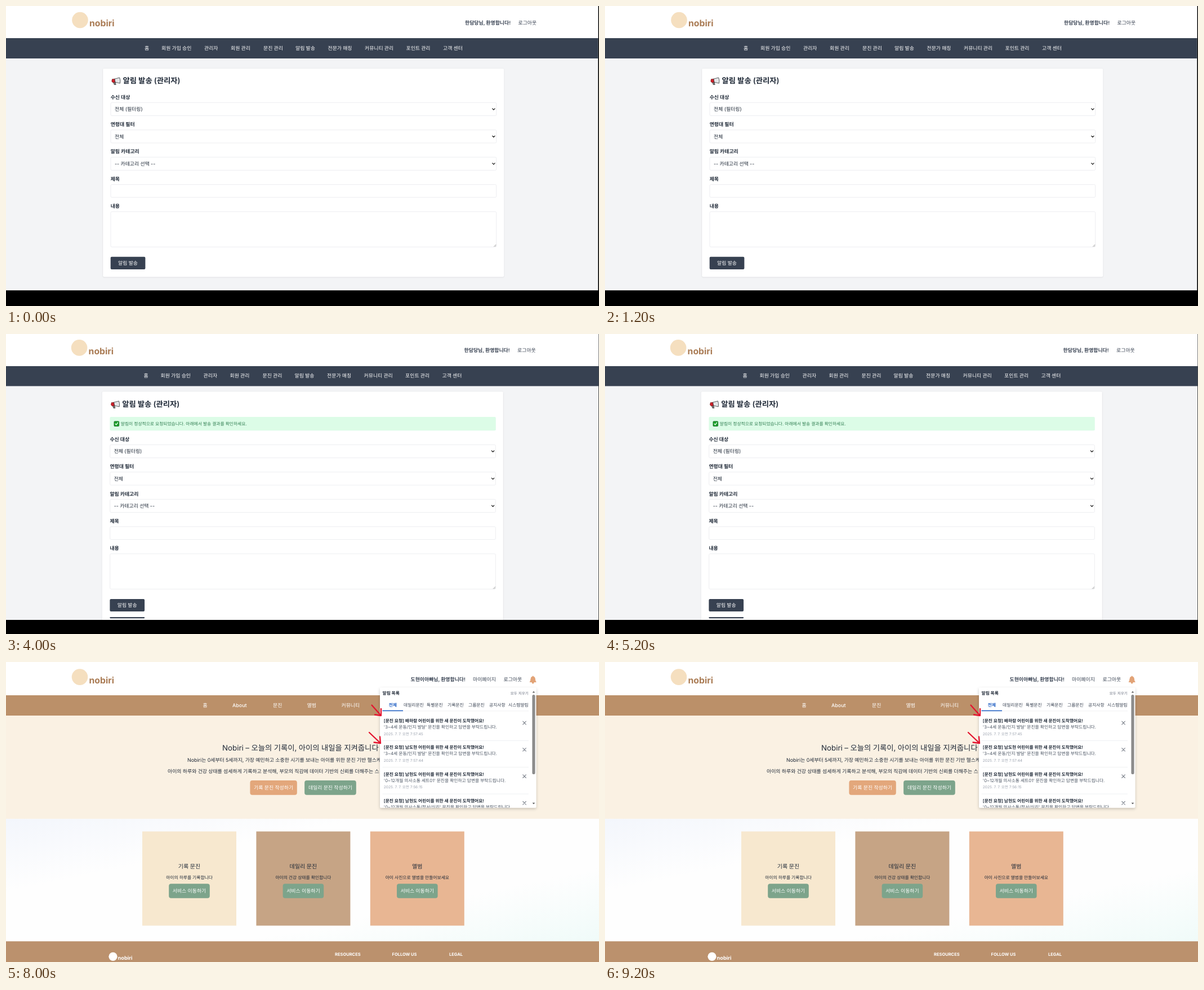
Write an HTML page that moves like this. It is 1053x532 px and loops after 10000 ms.

```html
<!DOCTYPE html>
<html lang="ko">
<head>
<meta charset="utf-8">
<title>알림 발송</title>
<style>
  html, body { margin: 0; width: 100%; height: 100%; overflow: hidden; background: #000; }
  svg { display: block; width: 100vw; height: 100vh; }
  text {
    font-family: Inter, 'Noto Sans CJK KR', 'Noto Sans CJK', sans-serif;
    text-rendering: geometricPrecision; word-spacing: -0.02em;
  }
</style>
</head>
<body>
<svg id="stage" viewBox="0 0 1053 532" xmlns="http://www.w3.org/2000/svg"></svg>
<script>
const SLOT = 2000;
const BRAND = 'nobiri', BRAND_CAP = 'Nobiri';
const INK = '#1f2937', SLATE = '#374151', LINE = '#e5e7eb', RED = '#e3142f', GREEN = '#7da48b';
const BASE = 8.9, SMALL = 7.78, TINY = 6.67;

// Text is placed by its vertical centre.
const text = (x, y, s, { size = BASE, fill = INK, w = 400, anchor = 'start' } = {}) =>
  `<text x="${x}" y="${y + size * 0.37}" font-size="${size}" font-weight="${w}" fill="${fill}" text-anchor="${anchor}">${s}</text>`;
const rect = (x0, y0, x1, y1, fill, r = 0, extra = '') =>
  `<rect x="${x0}" y="${y0}" width="${x1 - x0}" height="${y1 - y0}" rx="${r}" fill="${fill}" ${extra}/>`;
const frame = (x0, y0, x1, y1, fill = '#fff', stroke = LINE) =>
  rect(x0 + 0.3, y0 + 0.3, x1 - 0.3, y1 - 0.3, fill, 2, `stroke="${stroke}" stroke-width="0.7"`);
const path = (d, stroke, width = 1, fill = 'none') =>
  `<path d="${d}" stroke="${stroke}" stroke-width="${width}" fill="${fill}" stroke-linecap="round" stroke-linejoin="round"/>`;
const circle = (x, y, r, fill) => `<circle cx="${x}" cy="${y}" r="${r}" fill="${fill}"/>`;
const shift = (x, y, body) => `<g transform="translate(${x} ${y})">${body}</g>`;

const megaphone = (x, y) => shift(x, y,
  path('M3 2L5 7L8 7L7 2Z', '#3a3a3a', 0.7, '#777') +
  path('M1.5 -2.5L6 -3.3L7 2.6L2.6 3Q-.6 2 1.5 -2.5Z', '#6e1012', 0.7, '#d0202a') +
  path('M6 -3.3L14.5 -5.5Q16.5 -1 15.3 4.6L7 2.6Z', '#33363a', 0.8, '#e4e6e8'));
const tick = (x, y, s) =>
  rect(x, y - s / 2, x + s, y + s / 2, '#18a32a', 1, 'stroke="#0d5f19" stroke-width="0.8"') +
  path(`M${x + s * .24} ${y}L${x + s * .42} ${y + s * .22}L${x + s * .77} ${y - s * .24}`, '#fff', 1.2);
const cross = (x, y, r, color, w) =>
  path(`M${x - r} ${y - r}L${x + r} ${y + r}M${x + r} ${y - r}L${x - r} ${y + r}`, color, w);
const rocket = (x, y) => shift(x, y,
  path('M3 0L0 1L1 3L4 3ZM7 4L7 8L9 7L10 4Z', '#5c1a1a', 0.7, '#b83232') +
  path('M2 4L0 8L5 6Z', '#c0761c', 0.5, '#f0a934') +
  path('M3 3Q7 -4 13 -5Q12 1 6 6Z', '#1f2937', 1.1, '#d5dce2') +
  circle(8.6, -0.6, 1.4, '#34688f'));

const logo = (x, y) =>
  circle(x + 14.5, y, 14.3, '#f5dfbf') +
  `<text x="${x + 31}" y="${y + 11.4}" font-size="15.8" font-weight="700" fill="#aa7c55">${BRAND}</text>`;

function adminHeader(dx, dy, right) {
  const xs = [246, 276, 352, 399, 457, 514, 571.5, 637, 710.5, 776];
  const names = ['홈', '회원 가입 승인', '관리자', '회원 관리', '문진 관리', '알림 발송',
    '전문가 매칭', '커뮤니티 관리', '포인트 관리', '고객 센터'];
  return rect(0, 0, right, 57, '#fff') + rect(0, 57, right, 93 + dy, SLATE) +
    shift(dx, dy, logo(117, 25) +
      text(815, 29.5, '한담당님, 환영합니다!', { w: 600, fill: SLATE }) +
      text(909.5, 29.5, '로그아웃', { fill: SLATE }) +
      names.map((s, i) => text(xs[i], 74.6, s, { w: 500, fill: '#fff' })).join(''));
}

// Page ground, white card and header; the body is cut at the bottom edge.
function adminPage(dx, dy, right, bottom, cardTop, cardEnd, body) {
  const x = 172.3 + dx;
  return rect(0, 0, 1053, 532, '#000') + rect(0, 0, right, bottom, '#f3f4f6') +
    rect(x, cardTop, x + 711.8, cardEnd, '#fff', 2, 'filter="url(#soft)"') + body +
    adminHeader(dx, dy, right) + rect(0, bottom, 1053, 532, '#000');
}

const label = (x, y, s) => text(x, y, s, { w: 600 });

function select(x, y, name, value, off) {
  const ink = off ? '#7b8088' : INK;
  return label(x, y, name) + frame(x, y + 9.6, x + 685.3, y + 33.4) +
    text(x + 7.3, y + 21.6, value, { fill: ink }) +
    path(`M${x + 678} ${y + 20.5}l2.2 2.2l2.2 -2.2`, off ? '#777' : '#111', 1.2);
}

function message(x, y, title, content) {
  const x1 = x + 685.3, b = y + 121;
  return label(x, y, '제목') + frame(x, y + 9.7, x1, y + 33) + text(x + 5, y + 21.3, title) +
    label(x, y + 48.3, '내용') + frame(x, y + 57.8, x1, b) + text(x + 5, y + 69, content) +
    path(`M${x1 - 4.5} ${b - 1}l3.5 -3.5M${x1 - 2.5} ${b - 1}l1.5 -1.5`, '#777', 0.6) +
    rect(x, y + 138.2, x + 61.7, y + 160.4, SLATE, 2) +
    text(x + 30.85, y + 149, '알림 발송', { w: 500, fill: '#fff', anchor: 'middle' });
}

const heading = (x, y) => megaphone(x + 1.5, y) +
  text(x + 21.8, y, '알림 발송 (관리자)', { size: 13.34, w: 600 });

const blankForm = (x, y) =>
  select(x, y, '수신 대상', '전체 (필터링)') +
  select(x, y + 48.4, '연령대 필터', '전체') +
  select(x, y + 96.8, '알림 카테고리', '-- 카테고리 선택 --') +
  message(x, y + 145.2, '', '');

const emptyScene = () => adminPage(0, 0, 1051.4, 504.5, 111, 480.3,
  heading(185.7, 132.5) + blankForm(185.7, 161.4));

function filledScene() {
  const x = 184.4, set = '3~4세 운동/인지 발달';
  const rows = [['수신 대상', '위험군 (문진 발송)'], ['연령대 필터', '3~4세'],
    ['위험 카테고리 필터', '운동/인지 발달'], ['문진 세트 선택', set], ['알림 카테고리', '특별문진']];
  return adminPage(-1.4, -0.6, 1052.3, 507, 60, 540,
    rows.map((r, i) => select(x, 102 + i * 48.4, ...r, i === 4)).join('') +
    message(x, 343.8, set, `[${set}] 문진을 확인하고 답변을 부탁드립니다.`) +
    path('M254 461L237.5 477.5M238 467L237.5 477.8L249 477.5', RED, 2.3));
}

const sentScene = () => adminPage(-1.4, -0.6, 1052.3, 507, 102.3, 540,
  heading(184.4, 124.4) +
  rect(184.4, 147, 869.8, 171.3, '#dcfce7', 2) + tick(192, 159.2, 8.6) +
  text(203.8, 159, '알림이 정상적으로 요청되었습니다. 아래에서 발송 결과를 확인하세요.', { size: SMALL, fill: '#2f7d50' }) +
  blankForm(184.4, 186.5) + rect(184.4, 502, 246.1, 504.2, SLATE, 1));

function panel(top, split, bottom, title, rows, ink, titleInk, fill, border) {
  const x0 = 183.9, x1 = 869.4, mid = (top + split) / 2 - 0.3;
  return frame(x0, top, x1, bottom, '#fff', border) + frame(x0, top, x1, split, fill, border) +
    text(191.3, mid, title, { w: 600, fill: titleInk }) +
    path(`M854 ${mid + 1.9}l3.7 -3.8l3.7 3.8`, titleInk, 1.3) +
    rows.map((s, i) => {
      const y = split + 15.2 + i * 17.8;
      return circle(196.4, y + 0.6, 1.6, ink) + text(204.5, y, s, { fill: ink });
    }).join('');
}

function resultScene() {
  const child = (who, kid) => `${who} 님 [자녀: ${kid}]`;
  const good = [['문해솔', '배나림'], ['문해솔', '구다온'], ['문해솔', '구소온'], ['문해솔', '노라온'],
    ['표한결결', '남도현'], ['표한결결', '배하람']].map(p => child(...p) + ' 님');
  const bad = [['연습용계정4', '구아람'], ['채우진', '배시온'], ['채우진', '류가온'], ['보통인남철규', '남시누이4'],
    ['보통인남철규', '장오빠4'], ['보통인남철규', '류단우'], ['표한결', '길새봄']].map(p => child(...p));
  const count = (x, name, n, color) =>
    text(x, 138, `${name}: <tspan fill="${color}">${n}</tspan> 건`, { w: 600 });
  return adminPage(-2, -0.6, 1053, 507, 60, 540,
    rocket(185, 104.5) + text(202, 105, '발송 결과', { size: 11.12, w: 600 }) +
    frame(183.9, 121.8, 869.4, 154.3, '#f3fcfe', '#dfeaee') +
    tick(194.5, 138, 9.2) + count(207.8, '성공', 6, '#25964c') +
    cross(537, 138, 3, '#7c1616', 3.2) + cross(537, 138, 3, '#d22f2f', 2) + count(545, '실패', 7, '#d93636') +
    panel(163.4, 190.7, 320.7, '성공 내역 확인하기', good, '#4b5563', SLATE, '#f3f4f6', LINE) +
    panel(327.4, 354.9, 502.6, '실패 내역 확인하기', bad, '#a13030', '#991b1b', '#fef2f2', '#ecd5d5') +
    path('M193 285Q250 284.4 317.5 285', RED, 2.2) +
    path('M192 302.6Q250 302.4 319 304', RED, 2.2));
}

function notice(i, kid, set, time) {
  const y = 104 + i * 47.35;
  return text(670.8, y, `[문진 요청] ${kid} 어린이를 위한 새 문진이 도착했어요!`, { size: SMALL, w: 600 }) +
    text(670.8, y + 11.2, `'${set}' 문진을 확인하고 답변을 부탁드립니다.`, { size: SMALL, fill: '#4b5563' }) +
    text(670.8, y + 23.2, `2025. 7. 7. 오전 ${time}`, { size: TINY, fill: '#9ca3af' }) +
    cross(920.6, y + 4, 2.8, '#7b818b', 1.1) +
    rect(668.5, y + 35, 928, y + 35.6, LINE);
}

function popup() {
  const tabs = [[706, '데일리문진'], [747, '특별문진'], [784, '기록문진'], [821, '그룹문진'],
    [858, '공지사항'], [892, '시스템알림']];
  const notices = [['배하람', '3~4세 운동/인지 발달', '7:57:45'], ['남도현', '3~4세 운동/인지 발달', '7:57:44'],
    ['남현도', '0~12개월 의사소통 세트01', '7:56:15'], ['남현도', '0~12개월 의사소통/정서/심리', '7:56:15']];
  return rect(664, 45.5, 941.5, 258.5, '#fff', 2, 'filter="url(#deep)"') +
    `<g clip-path="url(#list)">` +
    text(668.5, 55.6, '알림 목록', { size: SMALL, w: 600 }) +
    text(928, 55.6, '모두 지우기', { size: TINY, fill: '#6b7280', anchor: 'end' }) +
    text(687, 75.8, '전체', { size: SMALL, w: 600, fill: '#2563c4', anchor: 'middle' }) +
    tabs.map(([x, s]) => text(x, 76, s, { size: SMALL, fill: SLATE })).join('') +
    rect(668.5, 86.6, 928, 87.2, LINE) + rect(668.5, 85.6, 705, 87.2, '#2563c4') +
    notices.map((n, i) => notice(i, ...n)).join('') + '</g>' +
    rect(934.4, 58, 939.6, 199, '#8c8c8c', 2.6) +
    path('M935.4 54L937 52L938.6 54ZM935.4 250L937 252L938.6 250Z', '#555', 0.5, '#555');
}

const pill = (x0, y0, x1, y1, fill, s) => rect(x0, y0, x1, y1, fill, 4) +
  text((x0 + x1) / 2, (y0 + y1) / 2, s, { fill: '#fff', anchor: 'middle' });

function tile(x, fill, title, note) {
  const c = x + 83.5;
  return rect(x, 300.5, x + 167, 467.5, fill) +
    text(c, 362.5, title, { size: 10, anchor: 'middle' }) +
    text(c, 382.5, note, { size: SMALL, anchor: 'middle' }) +
    pill(c - 36.3, 393.2, c + 36.3, 418.8, GREEN, '서비스 이동하기');
}

function homeScene() {
  const menu = [[349.5, '홈'], [402, 'About'], [474, '문진'], [534.5, '앨범'], [595.5, '커뮤니티']];
  const foot = [[584, 'RESOURCES'], [685.5, 'FOLLOW US'], [787, 'LEGAL']];
  return rect(0, 0, 1053, 532, '#fff') + logo(116.5, 26.6) +
    text(718.5, 31, '도현이아빠님, 환영합니다!', { w: 600, fill: SLATE }) +
    text(829, 31, '마이페이지', { fill: SLATE }) + text(883.5, 31, '로그아웃', { fill: SLATE }) +
    path('M930.5 35.2Q932 33.5 932 30Q932 26 935.7 26Q939.4 26 939.4 30Q939.4 33.5 941 35.2Z', '#e2a377', 1, '#e2a377') +
    circle(935.7, 36.5, 1.9, '#e2a377') + circle(935.7, 25.4, 1, '#e2a377') +
    rect(0, 59, 1053, 95, '#bb9069') +
    menu.map(([x, s]) => text(x, 76.4, s, { w: 500, fill: '#fff' })).join('') +
    rect(0, 95, 1053, 278.3, '#faf1e3') +
    text(384, 152, `${BRAND_CAP} – 오늘의 기록이, 아이의 내일을 지켜줍니다`, { size: 13.34 }) +
    text(322, 173.7, `${BRAND_CAP}는 0세부터 5세까지, 가장 예민하고 소중한 시기를 보내는 아이를 위한 문진 기반 헬스케어`) +
    text(287, 193.8, '아이의 하루와 건강 상태를 섬세하게 기록하고 분석해, 부모의 직감에 데이터 기반의 신뢰를 더해주는 스') +
    pill(433.4, 210, 516.8, 235.8, '#e3a77b', '기록 문진 작성하기') +
    pill(530.1, 210, 621.8, 235.8, GREEN, '데일리 문진 작성하기') +
    rect(0, 278.3, 1053, 495.3, 'url(#haze)') +
    tile(242, '#f7e8cf', '기록 문진', '아이의 하루를 기록합니다') +
    tile(444.4, '#c6a485', '데일리 문진', '아이의 건강 상태를 확인합니다') +
    tile(646.8, '#e8b693', '앨범', '아이 사진으로 앨범을 만들어보세요') +
    rect(0, 495.3, 1053, 532, '#bb916d') +
    circle(190, 522.3, 7.6, '#fff') +
    text(198.6, 524.5, BRAND, { size: 9.2, w: 700, fill: '#fff' }) +
    foot.map(([x, s]) => text(x, 518.5, s, { size: 7.5, w: 700, fill: '#fff' })).join('') +
    popup() +
    path('M649.5 76.5L665.5 94.5M666 83L666 95L655 93.5', RED, 2.3) +
    path('M645 125L664.5 143.5M664 132.5L665 144L653.5 142.5', RED, 2.3);
}

const defs = `<defs>
  <filter id="soft" x="-5%" y="-5%" width="110%" height="110%"><feDropShadow dx="0" dy="0.6" stdDeviation="1" flood-opacity="0.13"/></filter>
  <filter id="deep" x="-10%" y="-10%" width="120%" height="120%"><feDropShadow dx="0" dy="2" stdDeviation="2.5" flood-opacity="0.22"/></filter>
  <clipPath id="list"><rect x="664" y="45.5" width="269" height="213"/></clipPath>
  <linearGradient id="haze" x1="0" y1="0" x2="1" y2="1">
    <stop offset="0" stop-color="#f3f6fc"/><stop offset="0.3" stop-color="#fefefe"/>
    <stop offset="0.7" stop-color="#fefefe"/><stop offset="1" stop-color="#f0fbf9"/>
  </linearGradient></defs>`;

const scenes = [emptyScene, filledScene, sentScene, resultScene, homeScene];
const stage = document.getElementById('stage');
stage.innerHTML = defs + scenes.map(s => `<g class="scene" visibility="hidden">${s()}</g>`).join('');
const groups = [...stage.querySelectorAll('.scene')];

const start = performance.now();
let shown = -1;
function draw(now) {
  const i = Math.floor(Math.max(0, now - start) / SLOT) % groups.length;
  if (i !== shown) {
    groups.forEach((g, k) => g.setAttribute('visibility', k === i ? 'visible' : 'hidden'));
    shown = i;
  }
  requestAnimationFrame(draw);
}
draw(start);
</script>
</body>
</html>
```
